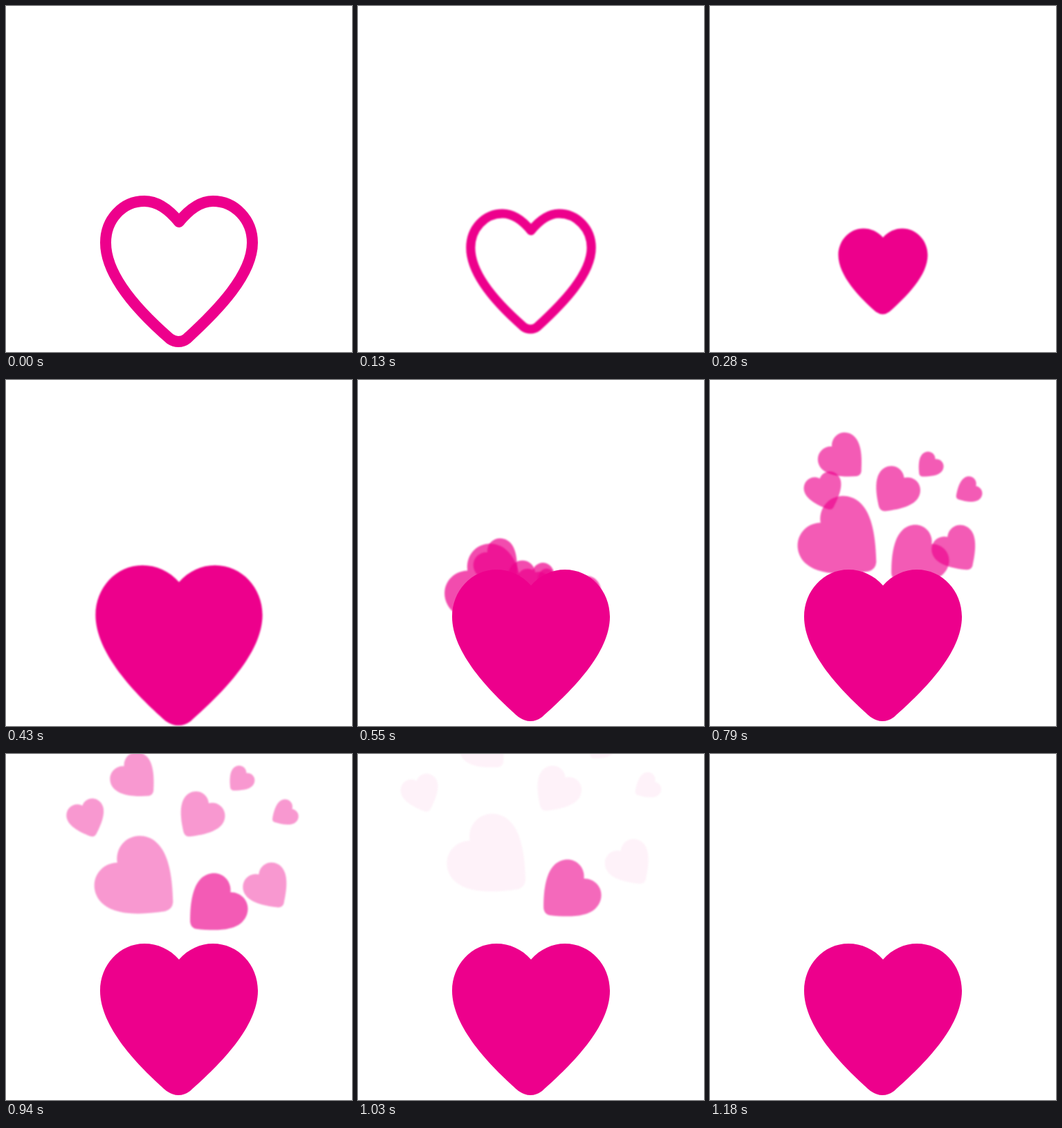
Write an HTML page with a canvas that moves like this. It is 500 by 500 pixels and loops after 3.31 s.

```html
<!DOCTYPE html>
<html lang="en">
<head>
<meta charset="utf-8">
<title>Heart burst</title>
<style>
  html, body { margin: 0; width: 100%; height: 100%; overflow: hidden; background: #fff; }
  canvas { display: block; width: 500px; height: 500px; }
</style>
</head>
<body>
<canvas id="stage" width="500" height="500"></canvas>
<script>
const ctx = document.getElementById('stage').getContext('2d');
const PINK = '#ed008c';
const LOOP = 3310, HOLD = 100, STEP = 30;
const CX = 250, CY = 383.5;
const SOFT = 'blur(0.8px)';

const solid = new Path2D(
  'M250 297C237 282 219 274 200 274C164 274 136 305 136 342' +
  'C136 394 190 450 232 487Q241 493 249 493Q258 493 266 487' +
  'C310 448 364 394 364 342C364 305 336 274 299 274C281 274 263 282 250 297Z');
const outline = new Path2D(
  'M250 312C237 296 221 282 200 282C168 282 144 309 144 342' +
  'C144 390 191 441 237 481Q243 485 249 485Q256 485 261 481' +
  'C307 439 356 388 356 342C356 309 331 282 299 282C279 282 263 296 250 312Z');

// Each heart passes (x, y) at time MID with velocity (vx, vy) per step;
// drag slows it down, and negative drag speeds it up.
const MID = 790;
const hearts = [
  { x: 194, y: 235, vx: 0.2, vy: -9.35, size: 0.517, turn: -50, drag: -0.02 },
  { x: 194, y: 114, vx: -1.2, vy: -16.9, size: 0.292, turn: -45 },
  { x: 166, y: 162, vx: -10.4, vy: -14.6, size: 0.241, turn: -21 },
  { x: 266, y: 162, vx: 2.7, vy: -15.1, size: 0.292, turn: 35 },
  { x: 316, y: 125, vx: 4.7, vy: -18.7, size: 0.165, turn: 42 },
  { x: 372, y: 161, vx: 6.3, vy: -15.9, size: 0.167, turn: 58 },
  { x: 358, y: 247, vx: 4.2, vy: -10, size: 0.29, turn: -36, drag: -0.02 },
  { x: 296, y: 259, vx: 0.85, vy: -8, size: 0.38, turn: 48, born: 690, gone: 1180 }
];

// 0 before a, 1 after b, linear between
const ramp = (t, a, b) => Math.min(1, Math.max(0, (t - a) / (b - a)));

function place(x, y, size, turn) {
  ctx.translate(x, y);
  ctx.rotate(turn * Math.PI / 180);
  ctx.scale(size, size);
  ctx.translate(-CX, -CY);
}

function drawSmall(t, { x, y, vx, vy, size, turn, drag = 0.03, born = 460, gone = 1043 }) {
  if (t < born || t >= gone) return;
  const way = (1 - Math.exp(-drag * (t - MID) / STEP)) / drag;
  ctx.save();
  ctx.globalAlpha = (0.7 - 0.055 * ramp(t, 670, MID)) * (1 - ramp(t, gone - 165, gone));
  ctx.filter = SOFT;
  place(x + vx * way, y + vy * way, size, turn);
  ctx.fill(solid);
  ctx.restore();
}

// Shrink as an outline, swell as a solid, then settle
function drawMain(t) {
  const size = 1 - 0.532 * ramp(t, 70, 250) + 0.59 * ramp(t, 250, 430) - 0.058 * ramp(t, 430, 520);
  ctx.save();
  if (t >= HOLD && t < 520) ctx.filter = SOFT;
  place(CX, CY, size, 0);
  if (t < 250) ctx.stroke(outline);
  else ctx.fill(solid);
  ctx.restore();
}

function draw(now) {
  const time = now % LOOP;
  const t = time < HOLD ? 0 : HOLD + Math.floor((time - HOLD) / STEP) * STEP;
  ctx.fillStyle = '#fff';
  ctx.fillRect(0, 0, 500, 500);
  ctx.fillStyle = ctx.strokeStyle = PINK;
  ctx.lineWidth = 16;
  ctx.lineJoin = 'round';
  for (const heart of hearts) drawSmall(t, heart);
  drawMain(t);
}

const start = performance.now();
function tick() {
  draw(performance.now() - start);
  requestAnimationFrame(tick);
}
tick();
</script>
</body>
</html>
```
